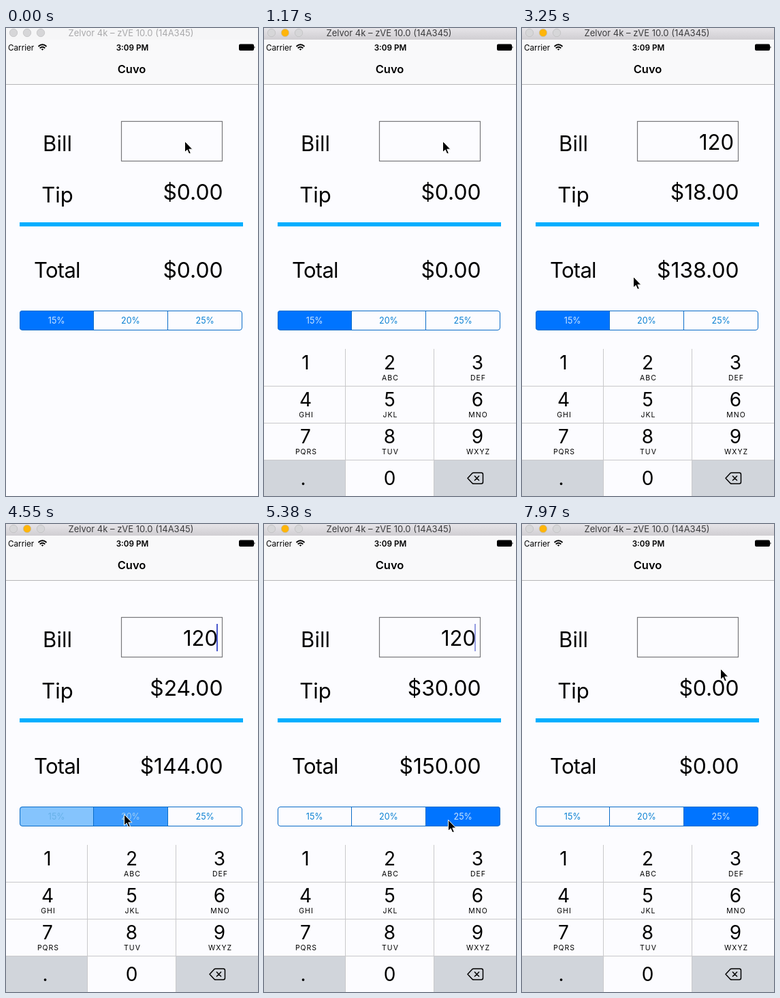
Animation of 370 by 684 pixels, one loop 8000 ms. Source, as an HTML page:

```html
<!DOCTYPE html>
<html lang="en">
<head>
<meta charset="utf-8">
<title>Tip calculator</title>
<style>
  html, body { margin: 0; width: 100%; height: 100%; overflow: hidden; background: #fcfcff; }
  svg { display: block; width: 100%; height: 100%; font-family: Inter, sans-serif; }
  .mid { text-anchor: middle; }
  .end { text-anchor: end; }
  .big { font-size: 31px; }
  .amount { font-size: 31.8px; text-anchor: end; }
  .digit { font-size: 28px; text-anchor: middle; }
  .letters { font-size: 10.5px; letter-spacing: 1px; text-anchor: middle; }
  .option { font-size: 12.5px; text-anchor: middle; }
</style>
</head>
<body>
<svg viewBox="0 0 370 684">
  <defs>
    <linearGradient id="chrome" x2="0" y2="1">
      <stop stop-color="#e6e4e8"/><stop offset="1" stop-color="#d0ced2"/>
    </linearGradient>
    <clipPath id="pill"><rect x="20" y="413" width="327" height="28.5" rx="4"/></clipPath>
  </defs>
  <rect width="370" height="684" fill="#fcfcff"/>

  <rect width="370" height="82" fill="#f9f9fa"/>
  <path d="M0 82.5H370" stroke="#b6b6b8"/>
  <rect id="titleBar" width="370" height="17"/>
  <g stroke="#bcbcbe" stroke-width=".7">
    <circle cx="11" cy="7" r="5.7" fill="#d6d6d8"/>
    <circle id="minimise" cx="31" cy="7" r="5.7"/>
    <circle cx="51" cy="7" r="5.7" fill="#d6d6d8"/>
  </g>
  <text id="windowTitle" class="mid" x="183.5" y="11.5" font-size="13">Zelvor 4k – zVE 10.0 (14A345)</text>

  <text x="3" y="32.5" font-size="11.7">Carrier</text>
  <g fill="none" stroke="#000" stroke-width="1.8">
    <path d="M47.5 27Q53.5 21.5 59.5 27M49.7 29.5Q53.5 26 57.3 29.5"/>
    <path d="M51.7 31L53.5 32.8L55.3 31Q53.5 29.5 51.7 31Z" fill="#000" stroke="none"/>
  </g>
  <text class="mid" x="185.5" y="32.5" font-size="11.7" font-weight="600">3:09 PM</text>
  <rect x="342" y="23.5" width="22" height="9.5" rx="2"/>
  <path d="M364.5 26.5Q366.5 28.2 364.5 30Z"/>
  <text class="mid" x="184.5" y="66" font-size="16.5" font-weight="600">Cuvo</text>

  <g class="big">
    <text class="mid" x="75.5" y="180">Bill</text>
    <text class="mid" x="75.5" y="254.5">Tip</text>
    <text class="mid" x="75" y="365" letter-spacing="-.7">Total</text>
  </g>
  <rect x="169.5" y="136.5" width="148" height="58" fill="none" stroke="#77777a" stroke-width="1.2"/>
  <text id="bill" class="big end" x="311" y="178"></text>
  <text id="tip" class="amount" x="318.5" y="251"></text>
  <text id="total" class="amount" x="318.5" y="365"></text>
  <rect id="caret" x="309" y="146" width="2" height="40" fill="#4a58cc"/>
  <rect x="20" y="284" width="328" height="6" fill="#00aeff"/>

  <g id="options"></g>
  <g id="keypad"></g>
  <path id="pointer" d="M0 0V16L3.7 12.7L6.2 18.5L8.8 17.4L6.3 11.7H11.3Z" stroke="#fff"/>
</svg>
<script>
const LOOP = 8000;
const $ = id => document.getElementById(id);
const clamp = x => Math.max(0, Math.min(1, x));
const mix = (a, b, k) => a + (b - a) * k;
const ease = x => x * x * (3 - 2 * x);
const latest = (list, t) => list.filter(item => item[0] <= t).pop();
const money = x => '$' + x.toFixed(2);

const WINDOW_ACTIVE = 80, KEYPAD_START = 170, FADE = 250, PRESS = 120;
const RATES = [15, 20, 25];
const edits = [[0, ''], [1700, '1'], [2000, '12'], [2500, '120'],
  [6900, '12'], [7100, '1'], [7300, '']];
const picks = [[-1000, 0], [4420, 1], [5080, 2]];
// time, x, y
const pointerPath = [[0, 262.5, 165.5], [2650, 262.5, 165.5], [3200, 163.5, 363.5],
  [3400, 163.5, 363.5], [3900, 173.5, 424.5], [4600, 173.5, 424.5], [4950, 270.5, 432.5],
  [5900, 270.5, 432.5], [6600, 291.5, 211.5], [LOOP, 291.5, 211.5]];

function buildOptions() {
  const edges = [20, 128.5, 237.5, 347];
  const cells = RATES.map((rate, i) => {
    const width = edges[i + 1] - edges[i];
    return `<rect id="fill${i}" x="${edges[i]}" y="413" width="${width}" height="28.5" clip-path="url(#pill)"/>
      <text id="label${i}" class="option" x="${edges[i] + width / 2}" y="432">${rate}%</text>`;
  });
  $('options').innerHTML = cells.join('') +
    `<path d="M128.5 413V441M237.5 413V441" stroke="#0a6cc8"/>
     <rect x="20.5" y="413.5" width="326" height="28" rx="3.5" fill="none" stroke="#0a6cc8"/>`;
}

function buildKeypad() {
  const letters = ['', 'ABC', 'DEF', 'GHI', 'JKL', 'MNO', 'PQRS', 'TUV', 'WXYZ'];
  const columns = [61, 184.5, 313.5];
  const keys = letters.map((word, i) => {
    const x = columns[i % 3], y = 469 + 54 * Math.floor(i / 3);
    return `<text class="digit" x="${x}" y="${y + 30}">${i + 1}</text>
      <text class="letters" x="${x + 1}" y="${y + 45.5}">${word}</text>`;
  });
  $('keypad').innerHTML =
    `<rect y="469" width="370" height="215" fill="#fcfcff"/>
     <path d="M0 631H119.5V684H0ZM249.5 631H370V684H249.5Z" fill="#d1d5db"/>
     <path d="M0 523.5H370M0 577.5H370M0 631.5H370M119.5 469V684M249.5 469V684" stroke="#c9c9cb"/>
     ${keys.join('')}
     <text class="digit" x="57.5" y="668">.</text>
     <text class="digit" x="184.5" y="668">0</text>
     <path d="M299 658L306 650.5Q306.8 650 308 650H319Q321.5 650 321.5 652.5V663.5Q321.5 666 319 666H308Q306.8 666 306 665.5ZM309 654.5L316 661.5M316 654.5L309 661.5"
       fill="none" stroke="#000" stroke-width="1.5" stroke-linejoin="round"/>`;
}

function drawWindow(t) {
  const active = t >= WINDOW_ACTIVE;
  $('titleBar').setAttribute('fill', active ? 'url(#chrome)' : '#f6f6f7');
  $('minimise').setAttribute('fill', active ? '#ffb50a' : '#d6d6d8');
  $('windowTitle').setAttribute('fill', active ? '#3c3c3e' : '#a9a9ab');
}

function drawAmounts(t) {
  const bill = latest(edits, t)[1];
  const tip = bill * RATES[latest(picks, t)[1]] / 100;
  $('bill').textContent = bill;
  $('tip').textContent = money(tip);
  $('total').textContent = money(+bill + tip);
}

function drawCaret(t) {
  const start = Math.max(400, latest(edits, t)[0]);
  const phase = Math.max(0, t - start) % 1000;
  const visible = phase < 700 ? 1 - clamp((phase - 500) / 100) : clamp((phase - 800) / 140);
  $('caret').setAttribute('opacity', t < 300 ? 0 : visible);
}

// Colour between two RGB triples.
const blend = (from, to, k) => `rgb(${from.map((c, i) => Math.round(mix(c, to[i], k)))})`;

function drawOptions(t) {
  const [since, chosen] = latest(picks, t);
  const pressed = picks.find(([time]) => time > t && time - PRESS <= t);
  const k = clamp((t - since) / FADE);
  RATES.forEach((_, i) => {
    let level = 0;
    if (i === chosen) level = mix(0.5, 1, k);
    else if (i === chosen - 1) level = 1 - k;
    else if (pressed && pressed[1] === i) level = 0.25;
    $('fill' + i).setAttribute('opacity', level);
    $('fill' + i).setAttribute('fill', blend([0, 150, 245], [0, 116, 255], level));
    $('label' + i).setAttribute('fill', blend([10, 128, 210], [205, 230, 255], level));
  });
}

function drawKeypad(t) {
  const s = Math.max(0, t - KEYPAD_START) * 0.0183;
  const offset = 215 * (1 + s) * Math.exp(-s);
  $('keypad').setAttribute('transform', `translate(0 ${offset < 0.5 ? 0 : offset})`);
}

function drawPointer(t) {
  const next = pointerPath.findIndex(point => point[0] > t);
  const [t0, x0, y0] = pointerPath[next - 1], [t1, x1, y1] = pointerPath[next];
  const k = ease((t - t0) / (t1 - t0));
  $('pointer').setAttribute('transform', `translate(${mix(x0, x1, k)} ${mix(y0, y1, k)})`);
}

function frame() {
  const t = performance.now() % LOOP;
  [drawWindow, drawAmounts, drawCaret, drawOptions, drawKeypad, drawPointer].forEach(draw => draw(t));
  requestAnimationFrame(frame);
}

buildOptions();
buildKeypad();
frame();
</script>
</body>
</html>
```
